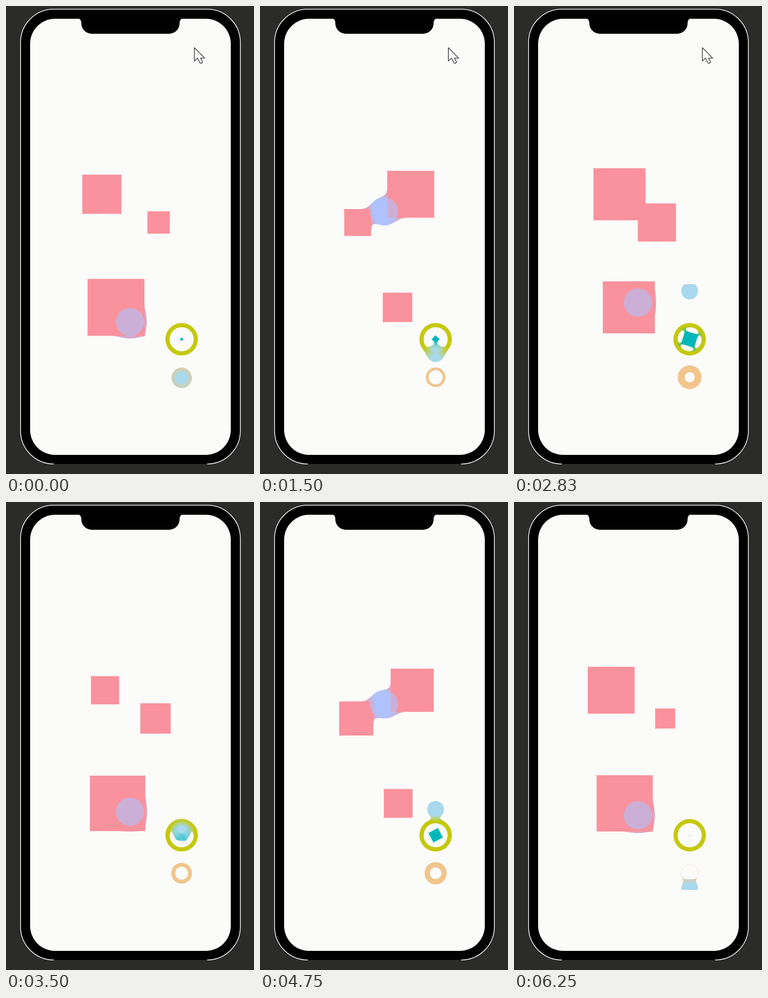
These frames come from a looping animation (545x1028 px, 6.33 s). An HTML page with a canvas:

```html
<!DOCTYPE html>
<html lang="en">
<head>
<meta charset="utf-8">
<title>Blending shapes</title>
<style>
  html, body { margin: 0; width: 100%; height: 100%; overflow: hidden; background: #2b2b2a; }
  svg, canvas { position: absolute; left: 0; top: 0; }
</style>
</head>
<body>
<svg width="545" height="1028" viewBox="0 0 545 1028">
  <path d="M105 1006 A73 73 0 0 1 32 933 V80 A73 73 0 0 1 105 7 H442 A73 73 0 0 1 515 80 V933 A73 73 0 0 1 442 1006"
        fill="#000" stroke="#fff" stroke-width="1.6"/>
  <rect x="53" y="28" width="441" height="958" rx="55" fill="#fbfbf9"/>
  <path d="M158 27.5 Q165.500 28 165.500 38 A23 23 0 0 0 188 61 H359 A23 23 0 0 0 381.500 38 Q381.500 28 389 27.500 Z"/>
</svg>
<canvas id="stage" width="545" height="1028"></canvas>
<svg width="545" height="1028" viewBox="0 0 545 1028">
  <path id="cursor" d="M0 .5 V30 L7 23.500 L12 34 Q15 36.500 18 32 L13.500 23.500 H22.500 Z"
        fill="#fbfbf9" stroke="#3a3a40" stroke-width="1.6" stroke-linejoin="round"/>
</svg>
<script>
const LOOP = 6330, FRAME = 250 / 3;
const PAPER = [251, 251, 249], PINK = [249, 146, 156], BLUE = [174, 195, 253];
const OLIVE = [197, 200, 12], TEAL = [0, 184, 186], ORANGE = [241, 197, 140], SKY = [168, 217, 237];

const ctx = document.getElementById('stage').getContext('2d');
const cursor = document.getElementById('cursor');
const clamp01 = v => v < 0 ? 0 : v > 1 ? 1 : v;
const cover = d => clamp01(0.5 - d);
const mix = (a, b, f) => f <= 0 ? a : f >= 1 ? b : a.map((v, i) => v + (b[i] - v) * f);

// Signed distances, negative inside
const disc = (x, y, r) => Math.hypot(x, y) - r;
const ring = (x, y, r, width) => Math.abs(disc(x, y, r)) - width / 2;
function box(x, y, half) {
  const qx = Math.abs(x) - half, qy = Math.abs(y) - half;
  return Math.hypot(Math.max(qx, 0), Math.max(qy, 0)) + Math.min(Math.max(qx, qy), 0);
}

// Smooth union of two coloured distances
function blend(a, b, k) {
  const h = clamp01(0.5 + 0.5 * (b.d - a.d) / k);
  return { d: b.d + (a.d - b.d) * h - k * h * (1 - h), c: mix(b.c, a.c, h) };
}

function region(left, top, width, height) {
  const image = ctx.createImageData(width, height);
  return shade => {
    let p = 0;
    for (let y = 0; y < height; y++) {
      for (let x = 0; x < width; x++) {
        const c = shade(left + x + 0.5, top + y + 0.5);
        image.data[p++] = c[0];
        image.data[p++] = c[1];
        image.data[p++] = c[2];
        image.data[p++] = 255;
      }
    }
    ctx.putImageData(image, left, top);
  };
}
const paintSquares = region(145, 345, 255, 400);
const paintRings = region(347, 611, 80, 241);

function squaresShader(sway, pulse, swell) {
  const dx = 62.5 * sway, ballY = 568.5 + 126 * sway;
  const squares = [
    [273 - dx, 413.5, 42.75 + 14.25 * swell],
    [273 + dx, 475.5, 32.25 + 10.75 * pulse],
    [273 - dx / 2, 662, 46.75 + 15.6 * sway]
  ];
  return (x, y) => {
    let square = Infinity;
    for (const [cx, cy, half] of squares) square = Math.min(square, box(x - cx, y - cy, half));
    const ball = disc(x - 272.5, y - ballY, 31);
    let c = PAPER;
    if (Math.min(square, ball) < 15) {
      const blob = blend({ d: square, c: PINK }, { d: ball, c: BLUE }, 22);
      c = mix(c, blob.c, cover(blob.d));
      c = mix(c, PINK, cover(square));
      c = mix(c, BLUE, 0.6 * cover(ball));
    }
    return c;
  };
}

function ringsShader(pulse, angle) {
  const cos = Math.cos(angle), sin = Math.sin(angle);
  const ballY = 732 - 120 * pulse, half = 8.2 + 7.6 * pulse, stroke = 8 * (1 + pulse);
  return (px, py) => {
    const x = px - 386, y = py - 732;
    const parts = [
      { d: ring(x, y, 31, 9.2), c: OLIVE },
      { d: box(x * cos + y * sin, y * cos - x * sin, half), c: TEAL },
      { d: ring(x, py - 815.5, 18.5, stroke), c: ORANGE },
      { d: disc(x, py - ballY, 18.5), c: SKY }
    ];
    const blob = parts.reduce((a, b) => blend(a, b, 13));
    return mix(PAPER, blob.c, cover(blob.d));
  };
}

// The pointer rests, then slides off through the top edge
function placeCursor(t) {
  const p = clamp01((t - 2.9) / 0.5);
  cursor.setAttribute('transform', `translate(${414 + 71 * p} ${91 - 90 * p})`);
  cursor.setAttribute('visibility', p < 1 ? 'visible' : 'hidden');
}

const start = performance.now();
let shown = -1;
function tick() {
  const time = (performance.now() - start) % LOOP;
  // The picture moves twelve times a second and rests on its first step
  const step = Math.max(1, Math.floor((time + 5) / FRAME));
  if (step !== shown) {
    shown = step;
    const t = step * FRAME / 1000;
    const sway = Math.cos(1.995 * t - 0.22);
    const pulse = Math.cos(2.97 * t - 2.62);
    const swell = Math.cos(3.972 * t - 5.05);
    paintSquares(squaresShader(sway, pulse, swell));
    paintRings(ringsShader(pulse, (117 * t - 44) * Math.PI / 180));
    placeCursor(t);
  }
  requestAnimationFrame(tick);
}
tick();
</script>
</body>
</html>
```
